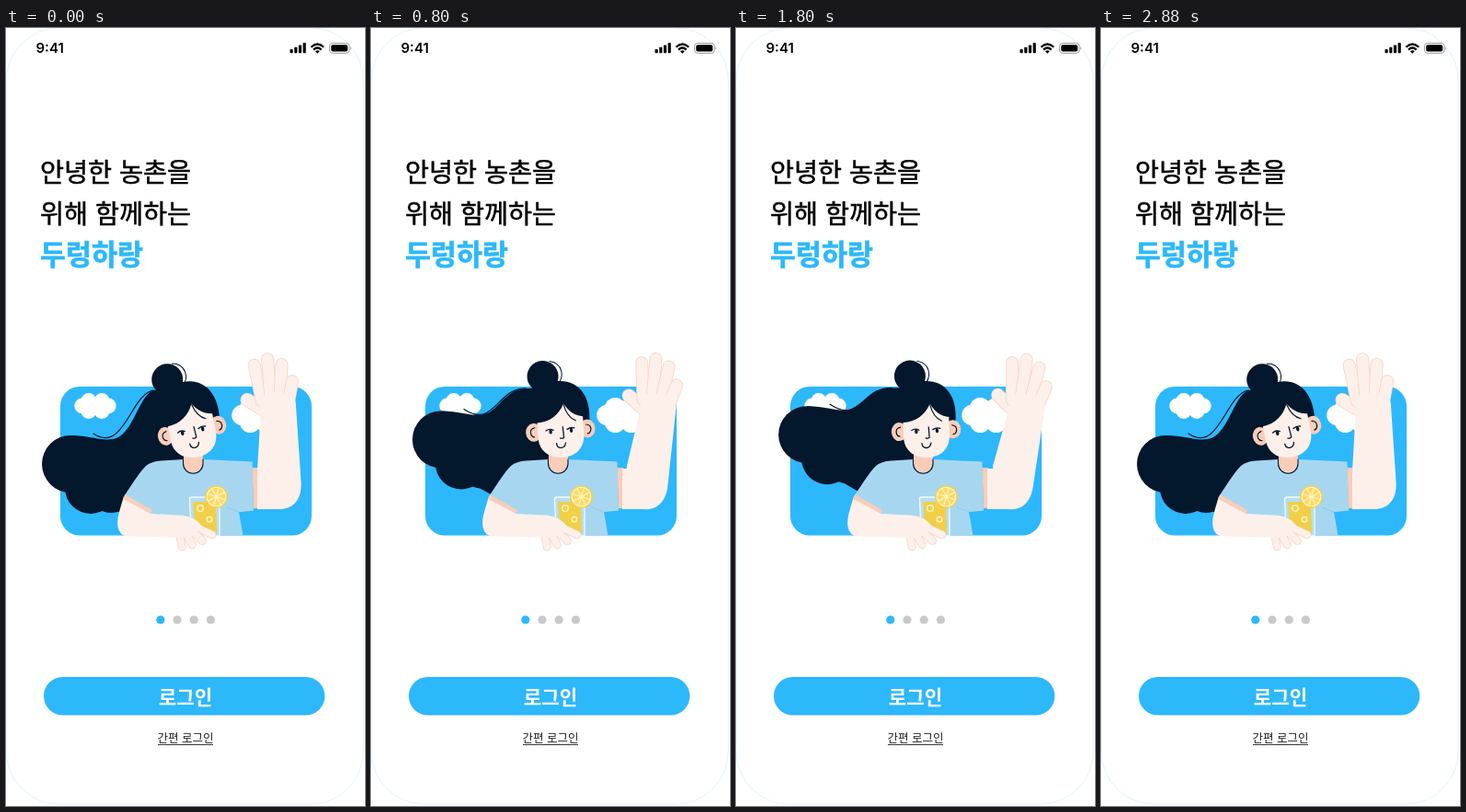
Write an HTML page that moves like this. It is 390x844 px and loops after 2.92 s.

```html
<!DOCTYPE html>
<html lang="ko">
<head>
<meta charset="utf-8">
<style>
html, body { margin: 0; width: 100%; height: 100%; overflow: hidden; background: #fff; }
svg { display: block; width: 390px; height: 844px; }
text { font-family: "Noto Sans CJK KR", "Noto Sans CJK", sans-serif; }
.sky { fill: #2db8fc; }
.dark { fill: #03172d; }
.cream { fill: #fdf0ea; }
.peach { fill: #facdb9; }
.ink { fill: none; stroke: #03172d; stroke-linecap: round; stroke-linejoin: round; }
</style>
</head>
<body>
<svg viewBox="0 0 390 844">
  <rect x=".2" y="-.3" width="388" height="842.5" rx="58" fill="#fff" stroke="#c9ebfc" stroke-width=".6"/>

  <!-- status bar -->
  <text x="32.5" y="27" font-size="15" font-weight="600" style="font-family:Inter,sans-serif">9:41</text>
  <g id="signal"></g>
  <g fill="none" stroke="#000" stroke-width="2.2">
    <path d="M331.4 20.8Q338.3 14.2 345.2 20.8"/>
    <path d="M334 23.6Q338.3 19.4 342.6 23.6"/>
  </g>
  <path d="M335.9 25.3Q338.3 23.2 340.7 25.3L338.3 27.7Z"/>
  <rect x="351.5" y="16.5" width="21.5" height="10.8" rx="3.2" fill="none" stroke="#999"/>
  <rect x="353.2" y="18.2" width="18" height="7.4" rx="1.8"/>
  <path d="M374.3 20Q376 22 374.3 24Z" fill="#999"/>

  <!-- headline -->
  <g font-size="28.3" font-weight="500" stroke="#000" stroke-width=".5">
    <text x="37" y="166.5">안녕한 농촌을</text>
    <text x="37" y="211.5">위해 함께하는</text>
  </g>
  <text class="sky" x="37" y="257" font-size="30.4" font-weight="700" stroke="#2db8fc" stroke-width=".7">두렁하랑</text>

  <!-- window -->
  <rect class="sky" x="59" y="389" width="273" height="161.5" rx="21"/>
  <g id="clouds" fill="#fff"></g>

  <!-- woman -->
  <path id="hair" class="dark"/>
  <g id="tail" class="dark">
    <circle cx="70" cy="473" r="31"/>
    <circle cx="92" cy="499" r="28"/>
    <circle cx="114" cy="501" r="25"/>
  </g>
  <path id="strand" class="ink" stroke-width="1.2"/>
  <path fill="#a7d7f0" d="M129 507C138 493 146 481 152 475Q158 470 168 469.500L192 468H215L267.500 470.500L269 523.500L253 525L257.500 551H150L157 526Z"/>
  <path d="M240 520L253 525" fill="none" stroke="#92c8e5"/>
  <path class="peach" d="M267.500 477H274V521H269Z"/>
  <path class="cream" d="M273 478H282L300 500V522H273Z"/>
  <g id="forearm">
    <g id="fingers"></g>
    <path class="cream" d="M273 480L277 412Q276 397 286 396H304Q315 397 315 410L317 440L320.500 492C322 511 312 522 297 522H288Z"/>
  </g>
  <path class="peach" d="M193 450H214V472A10.500 10.500 0 0 1 193 472Z"/>
  <path class="ink" stroke-width="1.1" d="M192.500 468V472.500A10.700 10.700 0 0 0 214 472.500V468"/>

  <g id="head">
    <circle class="dark" cx="192.500" cy="377" r="17"/>
    <path class="ink" stroke-width="1" d="M201 361C215 364 217 379 207 388"/>
    <path class="dark" d="M170 436C165 402 184 383 208 383C231 383 243 401 240 428L234 438L184 462Z"/>
    <ellipse class="peach" cx="178.500" cy="437" rx="8.500" ry="10"/>
    <ellipse class="peach" cx="237" cy="436.500" rx="8.500" ry="10"/>
    <path class="cream" d="M183 427C197 427 207 420 213 408C218 417 225 422 233 423V441C233 458 222 466 208 466C194 466 184 458 183 445Z"/>
    <path class="ink" stroke-width="1.2" d="M213 409Q216 423 225 427M180 432Q174 433 175.500 439Q176.500 442 179 442M236 432Q242 433 240.500 439Q239.500 442 237 442"/>
    <path class="ink" stroke-width="1.3" d="M192 436Q196 433.500 200 436M215 436Q219 433.500 223 435M210.500 433L211 444.500Q209 446 207 445M202.500 450.500C203 457 211 457.500 212.500 450.500"/>
    <ellipse class="dark" cx="197" cy="437.500" rx="1.700" ry="2.500"/>
    <ellipse class="dark" cx="219.500" cy="437.300" rx="1.700" ry="2.500"/>
  </g>

  <!-- lemonade and the arm holding it -->
  <path d="M199.500 510Q200 509 202 509H230Q232 509 232 511V551H204Q201 551 201 547Z" fill="#c5e6f6" fill-opacity=".5" stroke="#f2fbff" stroke-width="1.300"/>
  <path fill="#f1cf49" d="M203 514H228L229 548H206Z"/>
  <g fill="none" stroke="#fff3bd" stroke-width="1.400">
    <circle cx="211" cy="521" r="3.300"/><circle cx="221" cy="533" r="2.800"/>
  </g>
  <circle cx="228.500" cy="508.500" r="12.300" fill="#f5cf46"/>
  <circle cx="228.500" cy="508.500" r="10.300" fill="#f9db6a" stroke="#fff4c4" stroke-width="1.100"/>
  <path id="slices" stroke="#fff4c4" stroke-width="1.100"/>
  <g id="grip"></g>
  <path class="cream" d="M128 508C124 522 120 532 121.500 541Q123 551 133 551.500L200 553L213 541Q205 529 188 528.500L158 527Z"/>
  <path class="peach" d="M129 506L159 523L157.500 527L127.500 511Z"/>

  <!-- pager and buttons -->
  <g id="dots"></g>
  <rect class="sky" x="41" y="704" width="305.300" height="41.500" rx="20.750"/>
  <text x="195" y="733.500" font-size="21.200" font-weight="700" text-anchor="middle" fill="#fff">로그인</text>
  <text x="195" y="775" font-size="12.500" text-anchor="middle" fill="#222">간편 로그인</text>
  <path d="M165 777.500H225" stroke="#222" stroke-width=".9"/>
</svg>
<script>
const LOOP = 2920, STEP = 40;
const $ = id => document.getElementById(id);
const repeat = (n, make) => Array.from({ length: n }, (_, i) => make(i)).join('');

const ellipse = (x, y, rx, ry = rx) => `<ellipse cx="${x}" cy="${y}" rx="${rx}" ry="${ry}"/>`;

// A ring of puffs around a solid middle.
const cloud = (x, y, w, h) => ellipse(x, y, w * 0.75, h * 0.7) + repeat(6, i => {
  const a = i * Math.PI / 3;
  return ellipse(x + w * 0.62 * Math.cos(a), y + h * 0.46 * Math.sin(a), h * 0.6);
});

// A rounded finger with a thin edge.
function finger(x, y, degrees, length, width) {
  const a = degrees * Math.PI / 180;
  const line = (color, w) => `<path d="M${x} ${y}l${length * Math.cos(a)} ${length * Math.sin(a)}"
    stroke="${color}" stroke-width="${w}" stroke-linecap="round"/>`;
  return line('#f9d3c3', width + 1) + line('#fdf0ea', width - 0.6);
}

$('signal').innerHTML = repeat(4, i => {
  const h = 4.2 + 2.3 * i;
  return `<rect x="${308.5 + 4.7 * i}" y="${27.2 - h}" width="3.2" height="${h}" rx=".9"/>`;
});
$('clouds').innerHTML = cloud(97, 410, 23, 14) + cloud(274, 420, 28, 19);
$('fingers').innerHTML = finger(279, 414, 212, 20, 14) +
  repeat(4, i => finger(278 + 9.7 * i, 405, -102 + 7.5 * i, 46 - 6 * (i - 1) ** 2, 13));
$('grip').innerHTML = repeat(4, i => finger(203 - 5 * i, 540 + 2 * i, 25 + 18 * i, 23 - 2 * i, 8));
$('dots').innerHTML = repeat(4, i =>
  `<circle cx="${167.8 + 18.2 * i}" cy="642" r="4.6" fill="${i ? '#c9c9c9' : '#2db8fc'}"/>`);
$('slices').setAttribute('d', repeat(4, i => {
  const a = 0.3 + i * Math.PI / 4, x = 10 * Math.cos(a), y = 10 * Math.sin(a);
  return `M${228.5 - x} ${508.5 - y}l${2 * x} ${2 * y}`;
}));

function ease(t, from, to) {
  const u = Math.max(0, Math.min(1, (t - from) / (to - from)));
  return (1 - Math.cos(Math.PI * u)) / 2;
}

// The tail drifts as one piece; the hair between it and the head follows in part.
function drawHair(lift) {
  const dx = 9 * lift, dy = -40 * lift;
  const at = (x, y, follow = 1) => `${x + dx * follow} ${y + dy * follow} `;
  const root = `${160 + 12 * lift} ${393 - 3 * lift} `;
  const bend = at(143, 400, 0.3);
  $('tail').setAttribute('transform', `translate(${dx} ${dy})`);
  $('hair').setAttribute('d',
    `M${root}C${bend}${138} ${444 + dy} ${at(115, 446)}C${at(102, 448)}${at(92, 442)}${at(70, 442)}` +
    `L${at(92, 515)}${at(126, 526, 0.75)}${at(150, 515, 0.4)}175 478 205 460 195 390Z`);
  $('strand').setAttribute('d', `M${at(95, 440)}C${at(128, 462)}${at(135, 398, 0.3)}${root}`);
}

function draw(t) {
  const wave = ease(t, 0, 1300) - ease(t, 1460, 2760);
  const nod = 1.02 * (ease(t, 0, 1340) - ease(t, 1440, 2600));
  $('forearm').setAttribute('transform', `rotate(${14.7 * wave} 297 505)`);
  $('head').setAttribute('transform', `rotate(${11.5 * (nod - 1)} 205 465)`);
  drawHair(nod);
}

const start = performance.now();
function tick() {
  const t = (performance.now() - start) % LOOP;
  draw(Math.floor(t / STEP) * STEP);
  requestAnimationFrame(tick);
}
tick();
</script>
</body>
</html>
```
